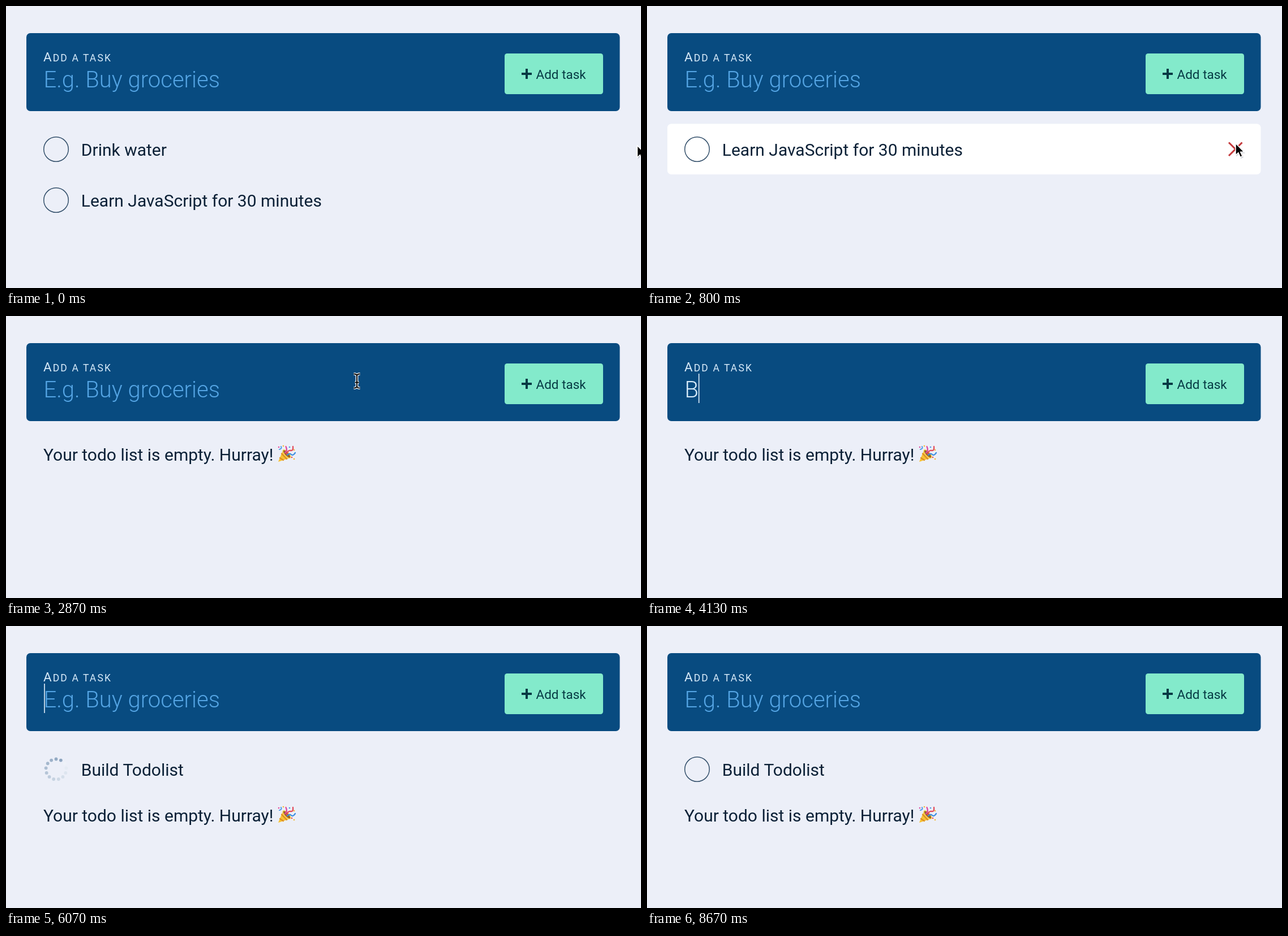
Write an HTML page that moves like this. It is 1122x499 px and loops after 8.74 s.

```html
<!DOCTYPE html>
<html lang="en">
<head>
<meta charset="utf-8">
<title>Todo list</title>
<style>
  html, body { margin: 0; width: 100%; height: 100%; overflow: hidden; background: #eceff8; }
  svg { display: block; width: 100%; height: 100%; font-family: Roboto, sans-serif; }
  text { white-space: pre; }
  .body { font-size: 30px; fill: #0b2036; }
  .input { font-size: 40px; font-weight: 300; }
</style>
</head>
<body>
<svg viewBox="0 0 1122 499">
  <rect width="1122" height="499" fill="#eceff8"/>
  <rect x="36" y="48" width="1048.5" height="138" rx="7" fill="#084b80"/>
  <text x="66" y="98" fill="#d9ecfa" letter-spacing="2.1"><tspan font-size="22.5">A</tspan><tspan font-size="17.5">DD A TASK</tspan></text>
  <text id="placeholder" class="input" x="66.5" y="144.3" fill="#54a4e3">E.g. Buy groceries</text>
  <text id="typed" class="input" x="66.5" y="144.3" fill="#d9ecfa"></text>
  <rect id="caret" y="102" width="1.6" height="52" fill="#e4f1fb"/>
  <rect x="881" y="84" width="174" height="72" rx="4.5" fill="#83eacb"/>
  <path d="M911 120H929M920 111V129" stroke="#063a44" stroke-width="4"/>
  <text x="936.5" y="129" font-size="22.5" fill="#063a44">Add task</text>

  <g id="hover">
    <rect x="36" y="208.5" width="1048.5" height="89.5" rx="7" fill="#fff"/>
    <path d="M1028 241.5L1051.5 265M1051.5 241.5L1028 265" stroke="#c4393c" stroke-width="3"/>
  </g>
  <g id="rows"></g>
  <g id="spinner" transform="translate(88.5 253.5)"></g>

  <g id="empty">
    <text class="body" x="66" y="256">Your todo list is empty. Hurray!</text>
    <g transform="translate(480 228)" fill="none" stroke-linecap="round">
      <path d="M1 30L9.5 9Q17 12 22.5 23Z" fill="#f7c233"/>
      <path d="M4 23L10 27M7 15.5L16 25" stroke="#dd8d25" stroke-width="2.2"/>
      <ellipse cx="16" cy="16" rx="3.8" ry="9.3" transform="rotate(-43 16 16)" fill="#9a6424" stroke="#fbd75a" stroke-width="1.5"/>
      <path d="M13 14Q18 10 14.5 3" stroke="#e0479d" stroke-width="2.3"/>
      <path d="M16 16Q18 9 23 10T27 3" stroke="#e34c5c" stroke-width="2.3"/>
      <path d="M17 18Q21 14 24 17T31 14" stroke="#3f8fe0" stroke-width="2.3"/>
      <path d="M3 8Q8 7 6 3" stroke="#4d9ae6" stroke-width="2"/>
      <g id="confetti"></g>
    </g>
  </g>

  <g id="arrow">
    <path d="M1 2V23.5L6 19L9.3 27L14 25L10.6 17.5H17Z" fill="#23304a" opacity=".2"/>
    <path d="M0 0V21L4.8 16.5L8.2 24.4L12 22.8L8.6 15.2H15Z" fill="#000" stroke="#fff" stroke-width="1.5"/>
  </g>
  <g id="beam" fill="none">
    <path id="beamShape" d="M-5.5 -12.5Q0 -12.5 0 -9Q0 -12.5 5.5 -12.5M0 -9.5V9.5M-5.5 12.5Q0 12.5 0 9Q0 12.5 5.5 12.5M-3.5 2.5H3.5" stroke="#fff" stroke-width="4.6"/>
    <use href="#beamShape" id="beamCore"/>
    <path d="M-5.5 -12.5Q0 -12.5 0 -9Q0 -12.5 5.5 -12.5M0 -9.5V9.5M-5.5 12.5Q0 12.5 0 9Q0 12.5 5.5 12.5M-3.5 2.5H3.5" stroke="#000" stroke-width="1.9"/>
  </g>
</svg>
<script>
const LOOP = 8740;
const FIRST_DELETE = 730, SECOND_DELETE = 1465;
const FOCUS = 2930, SUBMIT = 5995, SAVED = 8665, BLINK = 533;
const TASK = 'Build Todolist';
const KEY_TIMES = [4065, 4195, 4325, 4465, 4525, 4595, 4865, 4995, 5065, 5130, 5265, 5395, 5465, 5595];
const DOTS = 13, SPIN = 1000;

const $ = id => document.getElementById(id);
const show = (el, on) => el.setAttribute('display', on ? 'inline' : 'none');
const place = (el, x, y) => el.setAttribute('transform', `translate(${x} ${y})`);
const clamp = v => Math.min(1, Math.max(0, v));
const mix = (a, b, p) => a + (b - a) * p;

function add(parent, tag, attrs, text = '') {
  const el = document.createElementNS('http://www.w3.org/2000/svg', tag);
  for (const key in attrs) el.setAttribute(key, attrs[key]);
  el.textContent = text;
  return parent.appendChild(el);
}

function makeRow(label) {
  const group = add($('rows'), 'g', {});
  const circle = add(group, 'circle', { cx: 88.5, cy: 253.5, r: 21.75, fill: 'none', stroke: '#34506b', 'stroke-width': 1.5 });
  add(group, 'text', { class: 'body', x: 132.8, y: 265.3 }, label);
  return { group, circle };
}

const water = makeRow('Drink water');
const learn = makeRow('Learn JavaScript for 30 minutes');
const build = makeRow(TASK);

const dots = Array.from({ length: DOTS }, (_, i) => {
  const angle = i / DOTS * 2 * Math.PI;
  return add($('spinner'), 'circle', { cx: 18 * Math.sin(angle), cy: -18 * Math.cos(angle), r: 2.9 });
});

[[10, 2, '#f2b632'], [21, 4, '#4d9ae6'], [29, 9, '#f2b632'], [25, 22, '#e34c5c'], [29, 25, '#f2b632'], [2, 4, '#e0479d']]
  .forEach(([cx, cy, fill]) => add($('confetti'), 'circle', { cx, cy, r: 1.3, fill }));
$('beamCore').remove();

function pointerAt(t) {
  if (t < 2330) {
    const p = 1 - (1 - clamp(t / 400)) ** 3;
    return [mix(1116, 1040, p), mix(247, 243, p)];
  }
  const p = clamp((t - 2330) / 520), eased = p * p * (3 - 2 * p);
  return [mix(1040, 620, eased), mix(243, 115, eased)];
}

function drawInput(t) {
  const count = t < SUBMIT ? KEY_TIMES.filter(k => k <= t).length : 0;
  $('typed').textContent = TASK.slice(0, count);
  show($('placeholder'), count === 0);
  const start = t < SUBMIT ? FOCUS : SUBMIT;
  const blinkOn = Math.floor((t - start) / BLINK) % 2 === 0;
  show($('caret'), t >= FOCUS && (count > 0 || blinkOn) && t < SAVED);
  $('caret').setAttribute('x', 67.2 + (count ? $('typed').getComputedTextLength() - 0.8 : 0));
}

function drawList(t) {
  const saving = t >= SUBMIT && t < SAVED;
  show(water.group, t < FIRST_DELETE);
  show(learn.group, t < SECOND_DELETE);
  place(learn.group, 0, t < FIRST_DELETE ? 90 : 0);
  show(build.group, t >= SUBMIT);
  show(build.circle, !saving);
  show($('empty'), t >= SECOND_DELETE);
  place($('empty'), 0, t >= SUBMIT ? 90 : 0);

  show($('spinner'), saving);
  const head = (t - 7070) / SPIN + 1.2 / DOTS;
  dots.forEach((dot, i) => {
    const age = (((head - i / DOTS) % 1) + 1) % 1;
    const [r, g, b] = [[138, 244], [163, 247], [190, 252]].map(([dark, pale]) => Math.round(mix(dark, pale, age)));
    dot.setAttribute('fill', `rgb(${r},${g},${b})`);
  });
}

function drawPointer(t) {
  const [x, y] = pointerAt(t);
  const visible = t < KEY_TIMES[0], overInput = y < 154;
  show($('arrow'), visible && !overInput);
  show($('beam'), visible && overInput);
  place($('arrow'), x, y);
  place($('beam'), x, y);
  show($('hover'), x < 1084 && t < SECOND_DELETE);
}

function draw(t) {
  drawInput(t);
  drawList(t);
  drawPointer(t);
}

const startTime = performance.now();
function tick() {
  draw((performance.now() - startTime) % LOOP);
  requestAnimationFrame(tick);
}
draw(0);
requestAnimationFrame(tick);
</script>
</body>
</html>
```
